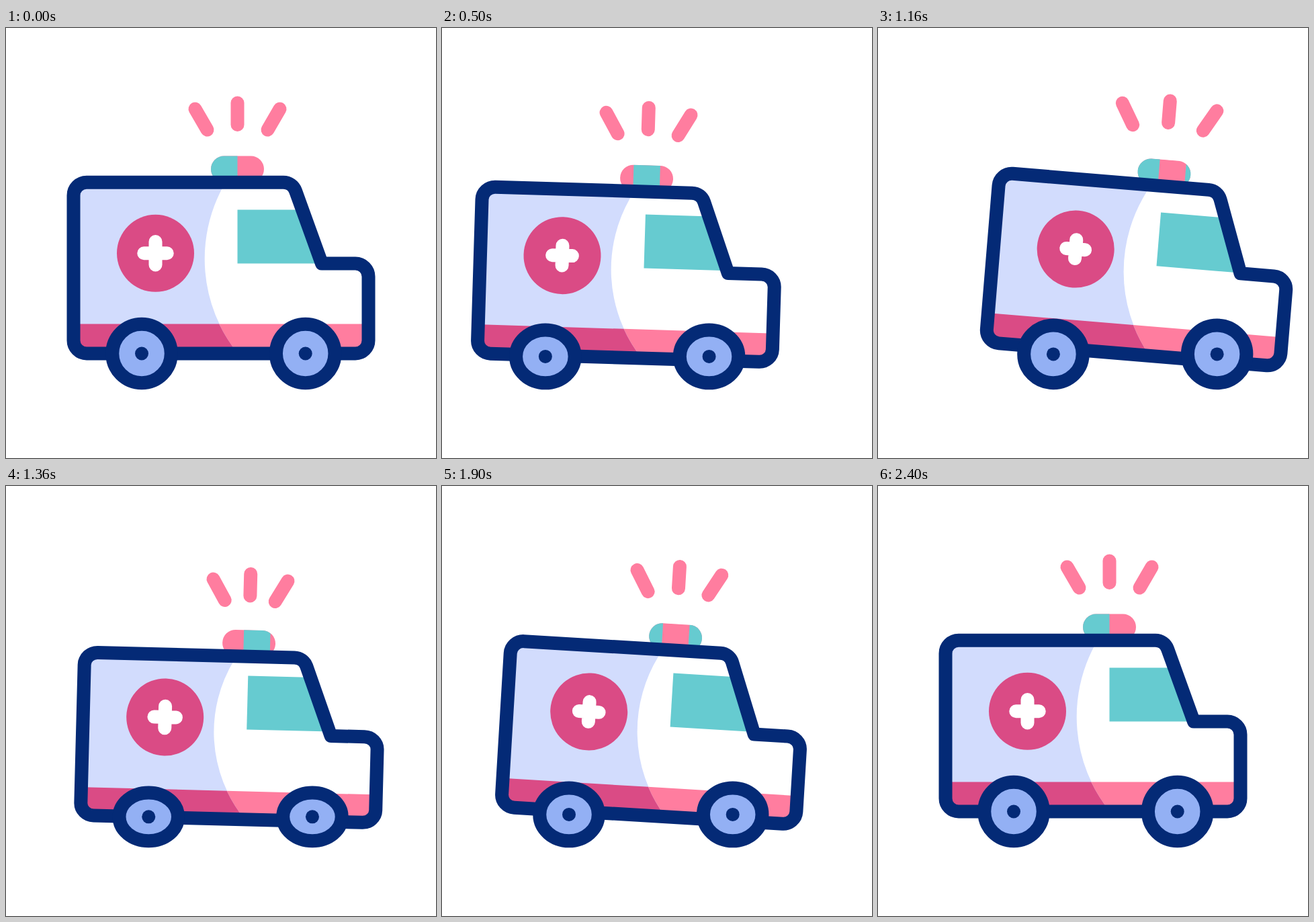
Animation, 640 px wide and 640 px high, one loop 2.42 s. Source, as an HTML page:

```html
<!DOCTYPE html>
<html lang="en">
<head>
<meta charset="utf-8">
<title>Ambulance</title>
<style>
  html, body { margin: 0; width: 100%; height: 100%; overflow: hidden; background: #fff; }
  svg { display: block; width: 100%; height: 100%; }
  .navy { stroke: #042a76; stroke-width: 20; stroke-linejoin: round; }
  .ray { stroke: #ff7d9f; stroke-width: 20; stroke-linecap: round; }
</style>
</head>
<body>
<svg viewBox="0 0 640 640">
  <defs>
    <clipPath id="lamp"><rect x="305" y="190.5" width="79" height="39" rx="19.5"/></clipPath>
  </defs>
  <g id="car">
    <g id="siren" clip-path="url(#lamp)">
      <rect x="305" y="190" width="79" height="40" fill="#ff7d9f"/>
      <g id="bands" fill="#66cbd0">
        <rect x="226" y="190" width="39.5" height="40"/>
        <rect x="305" y="190" width="39.5" height="40"/>
      </g>
    </g>
    <g id="panels">
      <path fill="#fff" d="M105 235H426L469 351H534V484H105Z"/>
      <path fill="#d2dcfd" d="M105 235H323.7A225 225 0 0 0 344.8 484H105Z"/>
      <path fill="#ff7d9f" d="M317.2 440.5H535V484H344.8A225 225 0 0 1 317.2 440.5Z"/>
      <path fill="#da4b85" d="M105 440.5H317.2A225 225 0 0 0 344.8 484H105Z"/>
    </g>
    <path fill="#66cbd0" d="M344.5 270.5H441L469 350.5H344.5Z"/>
    <path id="shell" class="navy" fill="none"/>
    <circle cx="222.5" cy="335.3" r="57.5" fill="#da4b85"/>
    <path id="cross" stroke="#fff" stroke-width="20" stroke-linecap="round"/>
    <path id="rayL" class="ray" d="M281.5 120.5L299.5 151.5"/>
    <path id="rayM" class="ray" d="M344.5 111.5V144"/>
    <path id="rayR" class="ray" d="M407.5 120.5L389.5 151.5"/>
  </g>
  <g id="wheels">
    <ellipse class="navy" cx="202" rx="43.75" fill="#93b0f4"/>
    <ellipse class="navy" cx="445.7" rx="43.75" fill="#93b0f4"/>
    <circle cx="202" r="10" fill="#042a76"/>
    <circle cx="445.7" r="10" fill="#042a76"/>
  </g>
</svg>
<script>
const LOOP = 2420, STEP = 20, BASE = 484.5;
const $ = id => document.getElementById(id);
const set = (el, attrs) => { for (const k in attrs) el.setAttribute(k, attrs[k]); };
const move = (id, x, y) => set($(id), { transform: `translate(${x} ${y})` });
const ease = p => p * p * (3 - 2 * p);

// Eased value of a list of [time, value] keys
function track(keys, t) {
  for (let i = 1; i < keys.length; i++) {
    const [t0, a] = keys[i - 1], [t1, b] = keys[i];
    if (t <= t1) return a + (b - a) * ease((t - t0) / (t1 - t0));
  }
  return keys[keys.length - 1][1];
}

const drive = [[0, 0], [600, -52], [1000, 77], [1600, -26], [2200, 0]];
const tilt = [[0, 0], [400, 3], [800, -5], [1200, 5], [1600, -5], [2000, 5], [2400, 0]];
const beat = [[0, 1], [400, .8], [800, 1.2], [1200, .8], [1600, 1.2], [2000, .8], [2400, 1]];
const flash = [[0, 0]];
for (let i = 1; i < 12; i++) flash.push([i * 200, i % 2 ? -9.5 : 9.5]);
flash.push([2400, 0]);

// Outline squeezed towards its bottom edge, with an even line width
function shellPath(s) {
  const y = v => BASE + (v - BASE) * s;
  const arc = (x, v, sweep = 1) => `A19.5 ${19.5 * s} 0 0 ${sweep} ${x} ${y(v)}`;
  return `M120 ${y(229.7)}H412.8${arc(431, 242.5)}L470 ${y(350.5)}H520${arc(539.5, 370)}` +
    `V${y(465)}${arc(520, BASE)}H120${arc(100.5, 465)}V${y(249.2)}${arc(120, 229.7)}Z`;
}

function draw(t) {
  const dx = track(drive, t);
  const phase = t % 400 / 200;
  const bump = ease(phase > 1 ? 2 - phase : phase);
  const drop = 13.5 * bump, s = 1 - drop / 254.8;

  set($('car'), { transform: `translate(${dx} ${12.5 * bump}) rotate(${track(tilt, t)} 320 486)` });
  set($('panels'), { transform: `translate(0 ${BASE * (1 - s)}) scale(1 ${s})` });
  set($('shell'), { d: shellPath(s) });
  move('siren', 0, drop);
  move('bands', t % 400 / 400 * 79, 0);

  const h = 17.25 * track(beat, t);
  set($('cross'), { d: `M${222.5 - h} 335.3h${2 * h}M222.5 ${335.3 - h}v${2 * h}` });

  const out = track(flash, t);
  move('rayL', -out, -out);
  move('rayM', 0, -out);
  move('rayR', out, -out);

  const ry = 43.75 - 8.75 * bump;
  move('wheels', dx, 0);
  for (const el of $('wheels').children) {
    set(el, { cy: 528.25 - ry });
    if (el.tagName === 'ellipse') set(el, { ry });
  }
}

const start = performance.now();
function tick() {
  const t = (performance.now() - start) % LOOP;
  draw(Math.floor(t / STEP) * STEP);
  requestAnimationFrame(tick);
}
tick();
</script>
</body>
</html>
```
